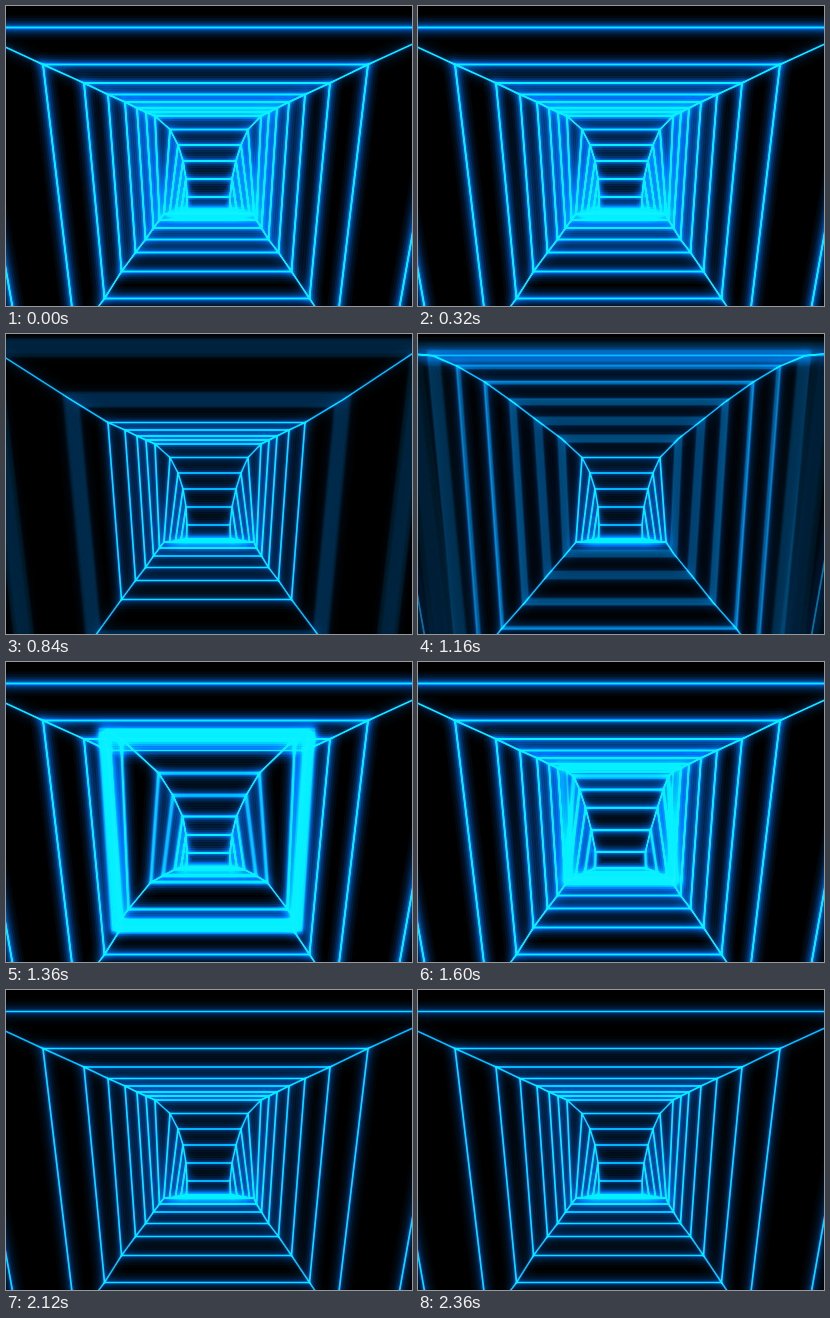
These frames come from a looping animation (406x300 px, 2.4 s). An HTML page with a canvas:

```html
<!DOCTYPE html>
<html lang="en">
<head>
<meta charset="utf-8">
<title>Neon tunnel</title>
<style>
  html, body { margin: 0; width: 100%; height: 100%; overflow: hidden; background: #000; }
  canvas { display: block; width: 406px; height: 300px; }
</style>
</head>
<body>
<canvas id="stage" width="406" height="300"></canvas>
<script>
const W = 406, H = 300, LOOP = 2400, STEP = 40;
const ctx = document.getElementById('stage').getContext('2d');

// Each frame of the tunnel: centre x, top y, half top width, bottom y, half bottom width
const rings = [
  [200, 21.5, 243, 400, 176],
  [199.5, 58.5, 162.5, 331, 130],
  [201, 77, 123, 292.5, 102.5],
  [200.5, 88.5, 98.5, 265.5, 85],
  [201, 96, 82, 246.5, 71.5],
  [201, 102, 70, 233.5, 61.5],
  [201.5, 106, 61.5, 222, 54],
  [202, 110, 53, 214, 48.5],
  [203, 123.5, 39, 208, 45],
  [203.5, 139, 31.5, 208, 40],
  [203.5, 155, 26.5, 207, 34],
  [203, 173, 23, 206, 28],
  [202.5, 191, 21.5, 205, 22]
];
const OUTER = 8;

// Glow as nested strokes: width and strength of the blue light
const glow = [[24, 14], [19, 20], [14, 28], [10, 40], [6, 50], [3.5, 50]];

// The pulse runs from the nearest ring to the farthest
function swell(i, t) {
  const far = i >= OUTER;
  const start = far ? 1192 + (i - OUTER) * 80 : 680 + i * 64;
  const x = (t - start) / (far ? 500 : 480);
  if (x <= 0 || x >= 1) return 1;
  return 1 + (far ? 0.36 : 0.65) * Math.sin(Math.PI * Math.pow(x, 1.1));
}

// Corners in the order top left, top right, bottom right, bottom left
function corners(i, t) {
  const [cx, top, a, bottom, b] = rings[i];
  const g = swell(i, t), cy = (top + bottom) / 2, h = (bottom - top) / 2 * g;
  return [
    [cx - a * g, cy - h], [cx + a * g, cy - h],
    [cx + b * g, cy + h], [cx - b * g, cy + h]
  ];
}

function trace(points, closed) {
  ctx.beginPath();
  points.forEach(([x, y]) => ctx.lineTo(x, y));
  if (closed) ctx.closePath();
}

function stroke(width, color) {
  ctx.lineWidth = width;
  ctx.strokeStyle = color;
  ctx.stroke();
}

function shine(power, spread = 0) {
  for (const [w, b] of glow) {
    stroke(w + spread, `rgb(0,${Math.round(b * power * 0.5)},${Math.round(b * power)})`);
  }
}

function drawRing(i, t, core, power) {
  const a = corners(i, t - STEP / 2), z = corners(i, t + STEP / 2);
  const move = Math.max(...a.map((p, k) =>
    Math.max(Math.abs(p[0] - z[k][0]), Math.abs(p[1] - z[k][1]))));
  const n = Math.min(24, Math.ceil(move * 1.2) + 1);
  trace(corners(i, t), true);
  shine(power / (1 + move / 14), Math.min(move * 0.5, 8));
  // Open-shutter smear of the moving line
  ctx.globalAlpha = 1 / n;
  for (let k = 0; k < n; k++) {
    const s = n > 1 ? k / (n - 1) - 0.5 : 0;
    trace(corners(i, t + s * STEP), true);
    stroke(1.7, core);
  }
  ctx.globalAlpha = 1;
}

function draw(time) {
  const frame = Math.floor((time % LOOP) / STEP);
  const t = frame * STEP;
  const bright = frame % 2 === 0;
  const core = bright ? 'rgb(16,225,255)' : 'rgb(4,185,240)';
  const power = bright ? 1 : 0.52;

  ctx.globalCompositeOperation = 'source-over';
  ctx.fillStyle = '#000';
  ctx.fillRect(0, 0, W, H);
  ctx.lineJoin = 'round';
  ctx.globalCompositeOperation = 'lighter';

  rings.forEach((_, i) => drawRing(i, t, core, power));

  const all = rings.map((_, i) => corners(i, t));
  for (let k = 0; k < 4; k++) {
    trace(all.map(c => c[k]), false);
    shine(power * 0.3);
    stroke(1.5, core);
  }

  // Hold the hottest areas at cyan
  ctx.globalCompositeOperation = 'multiply';
  ctx.fillStyle = 'rgb(120,240,255)';
  ctx.fillRect(0, 0, W, H);
}

const begin = performance.now();
function tick() {
  draw(performance.now() - begin);
  requestAnimationFrame(tick);
}
tick();
</script>
</body>
</html>
```
